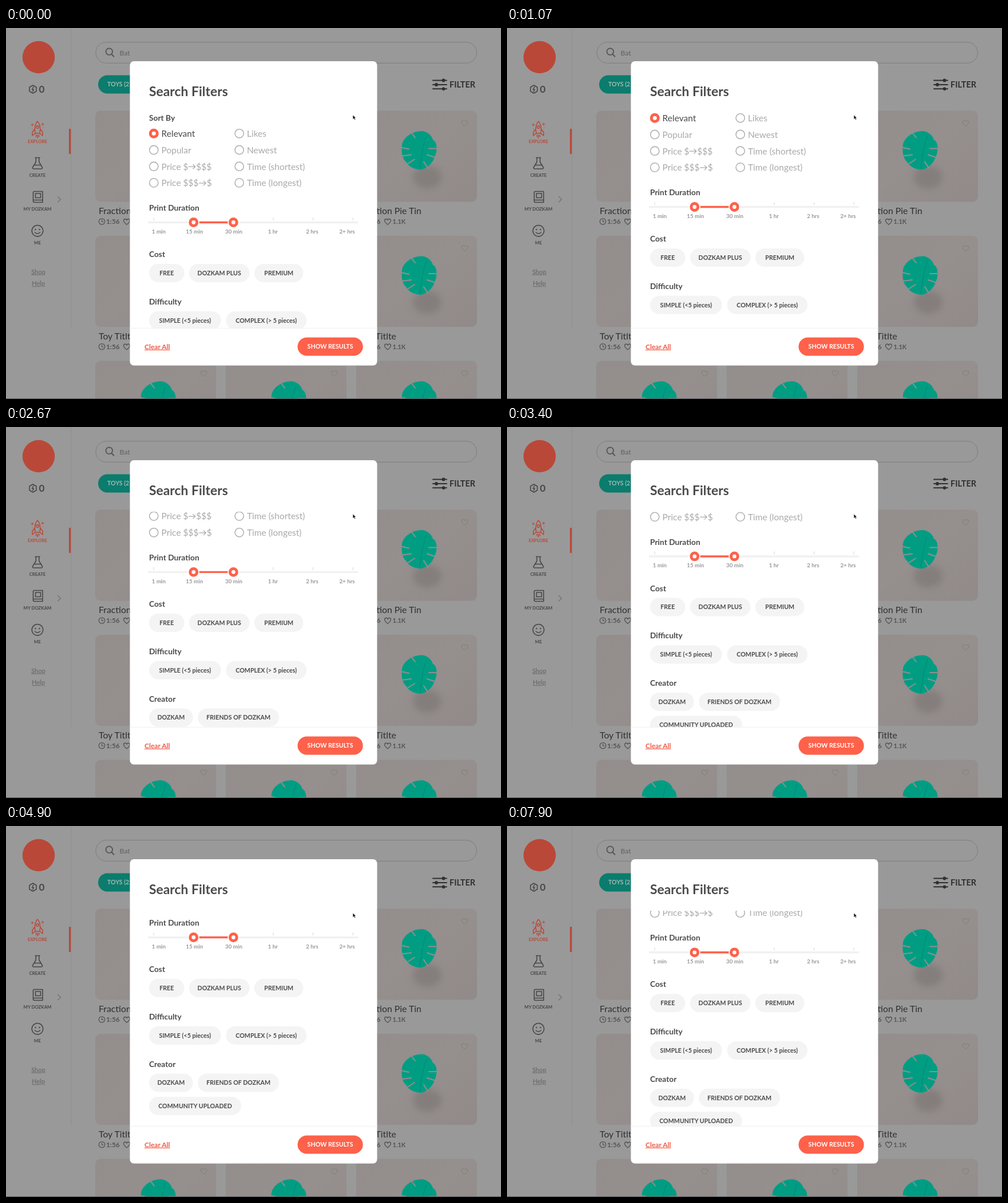
These frames come from a looping animation (865 by 648 pixels, 8000 ms). An HTML page:

```html
<!DOCTYPE html>
<html lang="en">
<head>
<meta charset="utf-8">
<title>Search Filters</title>
<style>
  html, body { margin: 0; width: 100%; height: 100%; overflow: hidden; background: #999; }
  svg { display: block; width: 100vw; height: 100vh; }
  text { font-family: Lato, "Open Sans", sans-serif; }
</style>
</head>
<body>
<svg id="stage" viewBox="0 0 865 648">
  <defs>
    <linearGradient id="cardFill" x1="0" y1="0" x2="1" y2="1">
      <stop offset="0" stop-color="#938d8c"/>
      <stop offset=".5" stop-color="#958f8e"/>
      <stop offset="1" stop-color="#918a89"/>
    </linearGradient>
    <filter id="soft" x="-60%" y="-60%" width="220%" height="220%"><feGaussianBlur stdDeviation="6"/></filter>
    <clipPath id="view"><rect x="217" y="148" width="431" height="376"/></clipPath>
    <path id="heart" d="M0 5C-3 2.6-5.4.6-5.4-1.9C-5.4-5.4-1.4-5.8 0-2.9C1.4-5.8 5.4-5.4 5.4-1.9C5.4.6 3 2.6 0 5Z" fill="none"/>
    <g id="leaf">
      <path fill="#009d83" d="M30 1C42-2 53 7 55 16C62 18 64 34 58 46C54 58 44 66 34 68C22 67 12 63 8 54C0 48-1 30 2 20C8 8 20 2 30 1Z"/>
      <path fill="none" stroke="#948e8d" stroke-width="2" stroke-linecap="round"
        d="M-1 29L13 32M1 44L17 42M9 59L23 50M63 31L48 31M60 47L45 42M46 65L39 54M17 3L24 12"/>
      <path fill="none" stroke="#008a74" stroke-width="1" d="M44 8C37 26 35 46 32 66"/>
    </g>
  </defs>
  <g id="page"></g>
  <rect x="216.500" y="58" width="432" height="531.500" rx="7" fill="#fff"/>
  <g clip-path="url(#view)"><g id="list"></g></g>
  <g id="frame"></g>
  <path d="M606 151.800V159.600L607.900 158L609.200 160.800L610.700 160.100L609.400 157.400H611.800Z" fill="#111" stroke="#fff" stroke-width=".7"/>
</svg>
<script>
const RED = '#ff614a', DIM_RED = '#ba4838', INK = '#4a4a4a', DARK = '#303030', ICON = '#474747';
const LOOP = 8000;

const tag = (name, attrs, body = '') =>
  `<${name} ${Object.entries(attrs).map(([k, v]) => `${k}="${v}"`).join(' ')}>${body}</${name}>`;
const text = (x, y, size, fill, body, more = {}) =>
  tag('text', { x, y, 'font-size': size, fill, ...more }, body);
const bold = (x, y, size, fill, body, more = {}) =>
  text(x, y, size, fill, body, { 'font-weight': 700, ...more });
const centred = (x, y, size, fill, body, more = {}) =>
  bold(x, y, size, fill, body, { 'text-anchor': 'middle', ...more });
const rect = (x, y, width, height, rx, fill, more = {}) =>
  tag('rect', { x, y, width, height, rx, fill, ...more });
const circle = (cx, cy, r, fill, more = {}) => tag('circle', { cx, cy, r, fill, ...more });
const line = (d, stroke, width, more = {}) =>
  tag('path', { d, stroke, 'stroke-width': width, fill: 'none', 'stroke-linecap': 'round', 'stroke-linejoin': 'round', ...more });
const heart = (x, y, stroke, width) =>
  tag('use', { href: '#heart', x, y, stroke, 'stroke-width': width });
const pill = (x1, x2, cy, label, fill = '#f4f4f4', ink = INK) =>
  rect(x1, cy - 16, x2 - x1, 32, 16, fill) + centred((x1 + x2) / 2, cy + 3.9, 10.7, ink, label);

function card(x, y, title) {
  const meta = y + 193.5;
  return rect(x, y, 211, 159, 9, 'url(#cardFill)') +
    tag('ellipse', { cx: x + 124, cy: y + 116, rx: 25, ry: 20, fill: '#777170', opacity: .55, filter: 'url(#soft)' }) +
    tag('use', { href: '#leaf', x: x + 79, y: y + 35 }) +
    heart(x + 189.500, y + 22, '#817b7a', 1) +
    text(x + 6, y + 180.500, 15.8, DARK, title) +
    circle(x + 11.500, meta, 5.200, 'none', { stroke: '#555', 'stroke-width': 1.3 }) +
    line(`M${x + 11.500} ${meta - 3}v3.400h2.400`, '#555', 1.2) +
    bold(x + 19, meta + 4.300, 11.800, '#555', '1:56') +
    heart(x + 55, meta + .3, '#555', 1.4) +
    bold(x + 63.500, meta + 4.300, 11, '#555', '1.1K');
}

function sidebar() {
  const nav = (y, label, fill = ICON) => centred(55, y, 7.8, fill, label);
  const link = (y, label) =>
    centred(56.500, y, 11, '#707070', label, { 'text-decoration': 'underline' });
  return line('M114 0V523', '#8f8f8f', 1) +
    circle(57, 51, 28.200, DIM_RED) +
    line('M47 100L53 103.500V110.500L47 114L41 110.500V103.500Z', ICON, 1.6) +
    line('M48 103L45.500 107.500H48.500L46.500 111', ICON, 1.5) +
    bold(57.500, 112.800, 17, ICON, '0') +
    line('M55 163C60 168 60.500 176 59 184H51C49.500 176 50 168 55 163ZM50.500 176L46 182V188L51 184M59.500 176L64 182V188L59 184M52.500 187V190M55 187V192M57.500 187V190', DIM_RED, 1.5) +
    circle(55, 173, 2.300, 'none', { stroke: DIM_RED, 'stroke-width': 1.4 }) +
    line('M46 167V171M44 169H48M64 166V170M62 168H66M46 176h.1M65 174h.1', DIM_RED, 1.1) +
    nav(200.800, 'EXPLORE', DIM_RED) +
    rect(110, 176, 3.200, 44, 0, DIM_RED) +
    line('M51 226.500H59M52.300 227V234L46.500 243.500Q46 246 48.500 246H61.500Q64 246 63.500 243.500L57.700 234V227M49.500 239.500H60.500', ICON, 1.6) +
    nav(259.800, 'CREATE') +
    line('M49.500 285.500H64V304.500H49.500Q47.500 304.500 47.500 302.500V287.500Q47.500 285.500 49.500 285.500ZM48 300.500H64M51.500 289H60.500V296.500H51.500Z', ICON, 1.6) +
    nav(318.800, 'MY DOZKAM') +
    line('M90.500 294.500L95.500 299.200L90.500 304', '#747474', 1.4) +
    circle(55, 354.300, 9.800, 'none', { stroke: ICON, 'stroke-width': 1.6 }) +
    circle(51.500, 352, 1.2, ICON) + circle(58.500, 352, 1.2, ICON) +
    line('M50.500 357Q55 361.500 59.500 357', ICON, 1.5) +
    nav(378, 'ME') +
    link(429.500, 'Shop') + link(450, 'Help');
}

function page() {
  let out = rect(0, 0, 865, 648, 0, '#999') + sidebar();
  out += rect(157, 24.800, 665.500, 36.500, 18.200, 'none', { stroke: '#7e7e7e', 'stroke-width': 1 }) +
    circle(180.300, 41.300, 5.800, 'none', { stroke: '#585858', 'stroke-width': 1.9 }) +
    line('M184.600 45.800L188.300 49.800', '#585858', 2.1) +
    text(198.500, 47.500, 12.2, '#606060', 'Bat') +
    rect(161, 82.500, 110, 32, 16, '#0b7c6d') +
    bold(177, 102.200, 10.6, '#a3b7b3', 'TOYS (2') +
    line('M746 91.500H770M746 99H770M746 106.300H770', DARK, 2) +
    [[764.5, 91.5], [752, 99], [764.5, 106.3]].map(([x, y]) => circle(x, y, 2.900, DARK)).join('') +
    bold(775, 104.200, 14.5, DARK, 'FILTER');
  [[144.5, 'Fraction Pie Tin'], [363, 'Toy Titlte'], [581.5, '']].forEach(([y, title]) => {
    for (let col = 0; col < 3; col++) out += card(156 + 228 * col, y, title);
  });
  return out + rect(0, 647, 865, 1, 0, '#55555a');
}

function radio(x, y, label, on) {
  const mark = on
    ? circle(x, y, 6, '#fff', { stroke: RED, 'stroke-width': 5 })
    : circle(x, y, 7.600, '#fff', { stroke: '#b3b3b3', 'stroke-width': 1.6 });
  const ink = on ? INK : '#a9a9a9';
  const put = (dx, s) => text(x + dx, y + 5.800, 15.5, ink, s);
  if (!label.includes('>')) return mark + put(13.300, label);
  const [left, right] = label.split('>');
  const tip = right.length > 1 ? 73 : 91.500;
  return mark + put(13.300, left) + put(tip + 1, right) +
    line(`M${x + tip - 12} ${y + .5}h11.500m-4-3.800l4 3.800l-4 3.800`, ink, 1.2);
}

function slider(y) {
  const at = i => 258.2 + 69.6 * i;
  let out = line(`M249.500 ${y}H614`, '#f1f1f1', 3.4);
  for (let i = 0; i < 6; i++) out += line(`M${at(i)} ${y - 8}v4`, '#dcdcdc', 1.2);
  out += line(`M${at(1)} ${y}H${at(2)}`, RED, 3.4);
  for (const i of [1, 2]) {
    out += circle(at(i), y, 10, '#fff') + circle(at(i), y, 5.900, '#fff', { stroke: RED, 'stroke-width': 5 });
  }
  const labels = ['1 min', '15 min', '30 min', '1 hr', '2 hrs', '2+ hrs'];
  const centres = [267, 329.2, 398, 466.3, 535, 596];
  return out + labels.map((s, i) => centred(centres[i], y + 19.300, 9.8, '#999', s)).join('');
}

function list() {
  const head = (y, s) => bold(250, y, 13.75, INK, s);
  const rows = [['Relevant', 'Likes'], ['Popular', 'Newest'],
    ['Price $>$$$', 'Time (shortest)'], ['Price $$$>$', 'Time (longest)']];
  return head(162, 'Sort By') +
    rows.map(([a, b], i) => {
      const y = 184.3 + 28.7 * i;
      return radio(258.300, y, a, i === 0) + radio(407.700, y, b, false);
    }).join('') +
    head(319.200, 'Print Duration') + slider(339.500) +
    head(400.200, 'Cost') +
    pill(250, 311.500, 428, 'FREE') + pill(320, 425.500, 428, 'DOZKAM PLUS') + pill(434, 519.500, 428, 'PREMIUM') +
    head(483, 'Difficulty') +
    pill(250, 375.700, 510.800, 'SIMPLE (&lt;5 pieces)') + pill(384.500, 525, 510.800, 'COMPLEX (&gt; 5 pieces)') +
    head(565.800, 'Creator') +
    pill(250, 326.700, 593.500, 'DOZKAM') + pill(335.300, 477, 593.500, 'FRIENDS OF DOZKAM') +
    pill(250, 411, 634, 'COMMUNITY UPLOADED');
}

function frame() {
  return bold(250, 119.200, 22.9, INK, 'Search Filters') +
    line('M217 524.300H648', '#efefef', 1) +
    bold(242, 560.700, 12, '#ee5b47', 'Clear All', { 'text-decoration': 'underline' }) +
    pill(509.500, 623.700, 556.500, 'SHOW RESULTS', RED, '#fff');
}

// Scroll gestures: start, end, from, to, ease-out power
const GESTURES = [
  [330, 1070, 0, 27, 1.56],
  [1540, 1730, 27, 52.6, 1.3],
  [1865, 2030, 52.6, 56, 1.3],
  [2470, 2930, 56, 111, 1.38],
  [3370, 3900, 111, 145, 1.3],
  [7130, 7530, 145, 118.7, 1.6]
];

function scrollAt(t) {
  let y = 0;
  for (const [start, end, from, to, power] of GESTURES) {
    if (t < start) break;
    const p = Math.min(1, (t - start) / (end - start));
    y = from + (to - from) * (1 - (1 - p) ** power);
  }
  return y;
}

const el = id => document.getElementById(id);
el('page').innerHTML = page();
el('list').innerHTML = list();
el('frame').innerHTML = frame();

const begin = performance.now();
function draw(now) {
  const t = Math.max(0, now - begin) % LOOP;
  el('list').setAttribute('transform', `translate(0 ${-scrollAt(t)})`);
  requestAnimationFrame(draw);
}
draw(begin);
</script>
</body>
</html>
```
